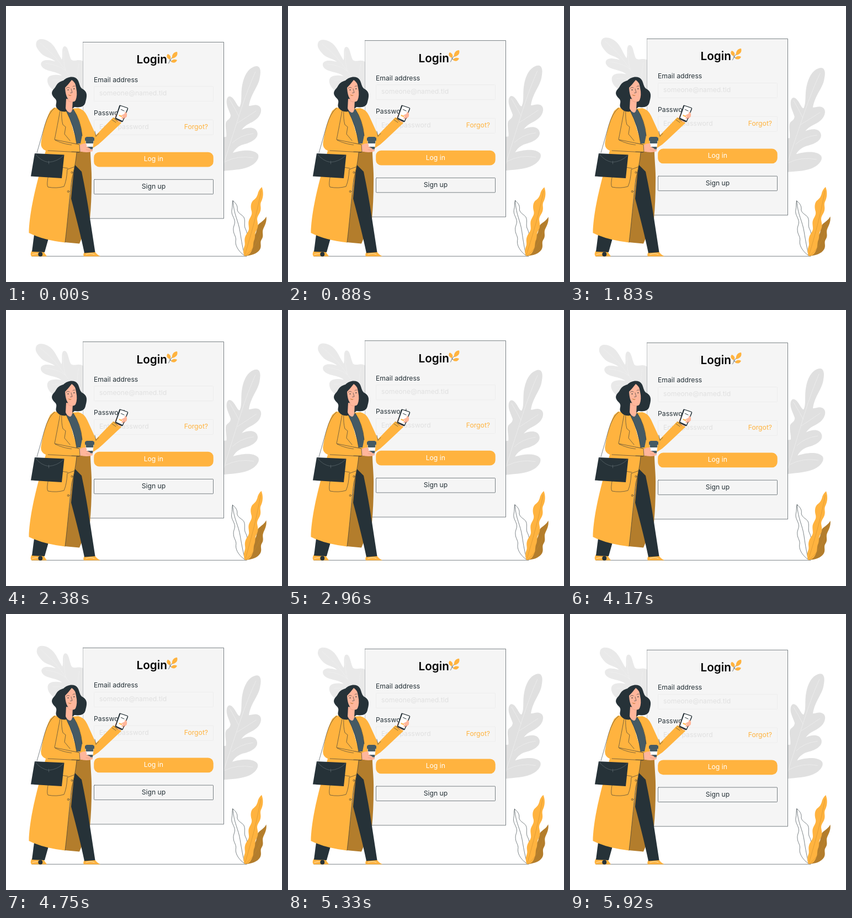
These frames come from a looping animation (500x500 px, 5960 ms). An HTML page:

```html
<!DOCTYPE html>
<html lang="en">
<head>
<meta charset="utf-8">
<title>Login</title>
<style>
  html, body { margin: 0; width: 100%; height: 100%; overflow: hidden; background: #fff; }
  svg { display: block; width: 100%; height: 100%; }
  text { font-family: Inter, "Open Sans", sans-serif; font-size: 12.2px; fill: #263238; }
  .title { font-size: 20.7px; font-weight: 600; fill: #000; }
  .hint { fill: #e0e0e0; }
  .mid { text-anchor: middle; }
  .ink { fill: #263238; }
  .gold { fill: #ffb33f; }
  .brown { fill: #b37d2c; }
  .skin { fill: #ffb69b; }
  .slate { fill: #455a64; }
  .line { fill: none; stroke: #263238; stroke-width: .6; stroke-linecap: round; stroke-linejoin: round; }
  .vein { fill: none; stroke: #f0f0f0; stroke-width: .7; stroke-linecap: round; }
</style>
</head>
<body>
<svg viewBox="0 0 500 500">
  <g id="leaves">
    <path fill="#e9e9e9" d="M55 66C57 58 69 59 77 64C89 71 92 83 101 97C104 91 99 75 106 73C113 73 113 86 118 97C124 102 132 94 141 101L160 170L140 170C128 160 118 154 101 156C88 157 76 147 75 136C74 125 86 123 101 126C92 118 73 119 66 111C60 104 65 97 76 98C82 98 86 100 89 100C79 92 70 94 62 84C56 77 53 72 55 66Z"/>
    <path class="vein" d="M62 67Q91 91 108 117T145 165M105 82Q103 100 108 117M72 104Q94 106 108 117M84 134Q108 131 128 142M132 105Q128 124 130 144"/>
    <path fill="#e0e0e0" d="M449 110C459 106 463 114 460 128C458 146 444 157 440 181C446 181 451 178 456 180C467 184 462 200 451 207C443 213 436 213 427 224C436 220 451 217 455 228C459 239 445 247 433 250C424 252 416 257 411 266C423 262 447 258 456 268C461 275 452 287 438 292C424 297 411 297 393 299L372 299L376 240L399 237C400 229 397 221 398 212C400 205 406 207 407 198C404 188 398 180 400 169C403 160 410 163 417 176C420 181 423 185 424 181C428 172 425 158 428 143C431 127 438 114 449 110Z"/>
    <path class="vein" d="M452 119Q438 150 425 190T393 290M405 169Q415 186 422 200M453 190Q435 202 419 212M448 231Q424 234 410 248M448 275Q420 270 397 282"/>
  </g>

  <g id="panel">
    <path fill="#f5f5f5" d="M139.5 65.5H394.5V385H139.5Z"/>
    <path class="line" d="M139.5 65.5H394.5V385H139.5"/>
    <path class="line" style="opacity:.45" d="M139.5 65.5V385"/>
    <text class="title" x="236.5" y="104.5">Login</text>
    <path class="line" d="M294.5 104Q299 94 306 88M297 98Q298 94 296 91M297 99Q301 101 304 99"/>
    <path class="gold" d="M301 95C300 88 304 83 310 83C312 89 308 94 301 95ZM297 97C291 95 290 90 293 87C298 89 300 93 297 97ZM299 101C301 96 306 96 310 98C308 103 303 104 299 101Z"/>
    <text x="159" y="137.6">Email address</text>
    <text x="159" y="198.3">Password</text>
    <g fill="none" stroke="#ebebeb" stroke-width=".8">
      <rect x="159.5" y="145.6" width="216" height="27" rx="1"/>
      <rect x="159.5" y="206.3" width="216" height="27" rx="1"/>
    </g>
    <text class="hint" x="169" y="162.3">someone@named.tld</text>
    <text class="hint" x="169" y="223">Enter password</text>
    <text x="322.7" y="223" style="fill:#ffb33f">Forgot?</text>
    <rect class="gold" x="159.2" y="264.7" width="216.5" height="26.7" rx="9.5"/>
    <text class="mid" x="267.3" y="281.5" style="fill:#fff">Log in</text>
    <rect class="line" x="159.5" y="314.3" width="216" height="26.5" rx="1"/>
    <text class="mid" x="267.5" y="331.3">Sign up</text>
  </g>

  <path class="line" d="M47 453.3H436"/>

  <g id="plant">
    <path class="brown" d="M471.5 381.5C473 391 468 399 466 404C463 411 468 416 463 423C459 429 464 434 460 441C455 449 445 452 433 453C437 441 443 435 445 427C446 419 451 416 453 410C455 404 454 399 458 395C464 390 468 388 471.5 381.5Z"/>
    <path class="line" style="fill:#fff" d="M411 353C417 357 420 363 419 369C420 376 428 378 431 383C434 390 431 395 433 402C436 408 438 414 436 421C433 430 434 440 432 452C424 447 415 436 416 426C418 418 412 414 412 406C411 399 416 395 414 388C412 381 408 377 409 370C411 363 409 358 411 353Z"/>
    <path class="line" d="M411 353C413 379 421 389 424 409S429 438 432 452"/>
    <path class="gold" d="M463.500 328C467 337 466 347 463 353C459 360 463 364 461 371C459 378 455 380 455 387C456 394 458 399 454 406C450 412 452 417 450 423C447 429 449 435 446 441C443 449 440 452 432 453C429 447 430 440 432 435C434 430 431 426 433 419C435 412 440 409 440 403C440 397 438 392 441 386C444 380 446 378 445 372C443 365 443 358 447 353C452 349 454 347 456 341C457 336 459 332 463.500 328Z"/>
    <path class="line" style="stroke:#c98a2b;stroke-width:.5" d="M462 335C455 375 445 410 433 450M470 388C460 420 450 440 434 452"/>
  </g>

  <g id="woman">
    <!-- legs and shoes -->
    <path class="gold" d="M47 443L68 445L74 453.5H46Q43 449 47 443ZM142 446L161 445Q164 450 171 453.5H141Q139 450 142 446Z"/>
    <path class="line" style="stroke:#fff" d="M48 450Q58 447 66 450M145 450Q154 447 160 450"/>
    <path class="ink" d="M51 414L77 421L70 446L47 445Z"/>
    <circle class="ink" cx="62.3" cy="449.700" r="4"/>

    <!-- coat lining and trousers -->
    <path class="brown" d="M117 335L126 250L153 250C152 275 156 296 155 320Q155 354 152 386L133 430.5L106 428Z"/>
    <path class="ink" d="M124 287L137 300Q146 343 152 384L161.500 446L142 447.500Q134 409 118 349Z"/>

    <!-- coat -->
    <path class="gold" d="M119 186L131 185Q141 187 147 199L163 234L194 202Q203 203 209 212L175 244Q167 252 158 257L153 264H127Z"/>
    <path class="gold" d="M87 184L109 186C118 211 125 231 128 256Q128 282 119 314C115 344 112 389 107 428.500Q67 424 41.500 411C42 379 52 335 60 306L72 262Q62 258 63.500 247Q69 212 80 190Z"/>
    <path class="slate" d="M109 190L122 187Q134 205 138 234L135 249L128 249Q123 218 109 190Z"/>
    <path class="line" d="M109 190Q124 218 128 250M122 187Q136 208 138 235M163 236L161 227M163 236L168 231M128 266Q126 287 119 314C115 344 112 389 107 428M192 206L199 211M195 203L202 209"/>
    <path class="line" d="M98 190Q93 217 88 242L132 251M101 190Q100 204 103 215L108 219L106 232L116 244M89 243Q107 252 127 252M76 262L132 265M77 306Q73 324 76 328Q91 331 105 327Q110 316 111 296L125 291M100 292L112 294"/>
    <g class="line" style="fill:#ffb33f">
      <circle cx="119.500" cy="301.500" r="1.6"/>
      <circle cx="112.800" cy="336" r="1.6"/>
      <circle cx="129.300" cy="251" r="1.2"/>
    </g>

    <!-- coffee -->
    <path class="skin" d="M133 252Q140 248 148 249L157 252V263Q147 267 133 263Z"/>
    <path fill="#fff" d="M144 243H159L157 259.500H146Z"/>
    <path class="slate" d="M143 239L146 237H157L160 239V244H143ZM144.500 244H158.500L158 249H145ZM145.600 255H157.400L157 259.500H146.200Z"/>
    <path class="skin" d="M134 252L145 250Q148 252 145 254L152 258Q156 262 151 264L135 264Z"/>
    <path class="line" style="stroke:#e3927b" d="M145 255L152 258M145 260L152 262"/>
    <path class="gold" d="M119 248L133 251L134 264L119 264Z"/>
    <path class="line" d="M119 248.500L133 251L134 264.500L119 264"/>

    <!-- bag -->
    <path class="line" d="M88 185Q77 193 70 217L56 266"/>
    <path class="ink" d="M52 267L105.500 269.500L101 312L45 308.500Z"/>
    <path class="line" style="stroke:#68747a" d="M53 268Q63 281 77 283Q93 282 104 271M77.500 281V286"/>

    <!-- phone -->
    <path class="skin" d="M197 201L202 192L207 195L213 190Q220 191 219 200L214 205L206 211Q200 207 197 201Z"/>
    <path class="ink" d="M206.500 179.500L220 184Q222 185 221 187L212 209Q211 211 209 210L198.500 205Q197 204 198 202L205 181Q205.500 179 206.500 179.500Z"/>
    <path fill="#fff" d="M207.300 181L220 185.200L211 208L199.500 202.800Z"/>
    <path class="gold" d="M205 197L210.500 199.500L209.800 201.300L204.300 199Z"/>
    <path class="line" style="stroke-width:1" d="M208.500 187.500L214 190"/>
    <path class="skin" d="M215 192Q220 192 219 199L211 205L209 203L212 199Q208 200 209 198L215 195Z"/>

    <!-- head -->
    <path class="ink" d="M104 135C112 127 125 126 130 134C134 141 133 148 140 151C149 157 146 166 144 174C142 184 132 184 124 183C115 192 101 195 93 186C87 180 94 175 90 169C84 163 80 158 86 151C92 146 90 139 104 135Z"/>
    <path class="skin" d="M109 168L121 170L120 187Q119 194 115 193Q109 190 108 185Z"/>
    <path class="skin" d="M107 148Q113 142 119 134Q126 138 127 148Q130 162 126 171Q122 176 115 171Q108 166 107 148Z"/>
    <path class="line" d="M109 149Q112 146 115 148M121 146Q123 144 125 145M118 150L120 157L116.500 157.500"/>
    <circle class="ink" cx="112.500" cy="152" r=".9"/>
    <circle class="ink" cx="123.300" cy="150" r=".9"/>
    <path d="M112 160Q116 163 119 161Q116 165 112 160Z" fill="#b36a17"/>
    <path class="line" style="stroke:#e3927b" d="M111 170Q115 174 119 174"/>
  </g>
</svg>
<script>
  const LOOP = 5960;
  const [leaves, panel, plant] = ["leaves", "panel", "plant"].map(id => document.getElementById(id));

  // Linear swing: 0, +1 at a quarter, -1 at three quarters.
  const swing = (t, period) => {
    const p = (t / period + 0.25) % 1;
    return 1 - 4 * Math.abs(p - 0.5);
  };

  const sway = (node, degrees, x, y) =>
    node.setAttribute("transform", `rotate(${degrees} ${x} ${y})`);

  function render(t) {
    const lift = 10 * (1 - Math.abs(1 - t / 3000));
    panel.setAttribute("transform", `translate(0 ${-lift})`);
    sway(leaves, swing(t, 1500), 258, 180);
    sway(plant, swing(t, 3000), 441, 391);
  }

  const start = performance.now();
  function tick() {
    render((performance.now() - start) % LOOP);
    requestAnimationFrame(tick);
  }
  render(0);
  requestAnimationFrame(tick);
</script>
</body>
</html>
```
